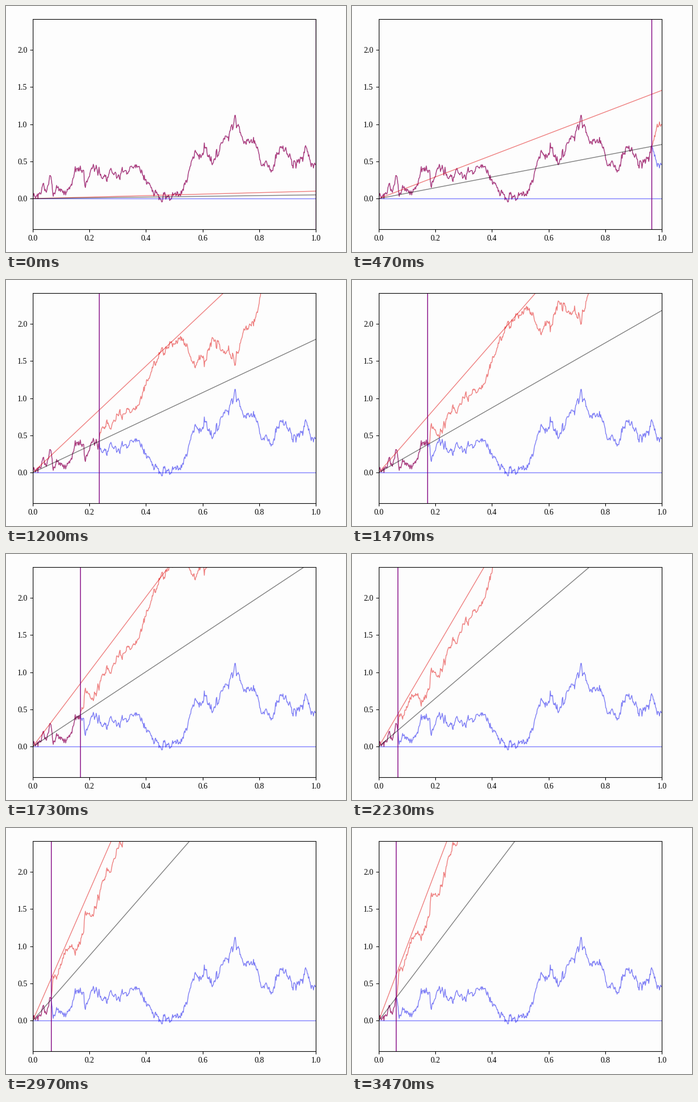
A matplotlib script for the animation above (3500 ms loop, 596 by 432 pixels).

```python
import numpy as np
import matplotlib.pyplot as plt
from matplotlib.animation import FuncAnimation
from matplotlib.lines import Line2D

W, H, DPI = 596, 432, 100
FRAMES, LOOP_MS = 105, 3500
LEFT, RIGHT, TOP, BOTTOM = 47, 543, 22.8, 392.4
UNIT, ZERO = 130.5, 338.2      # pixels per unit of y, pixel row of y = 0
STEPS = 500
PAPER, RED, BLUE = "#fdfdfd", "#e00000", "#0000ee"

# Main turning points of the walk: time, height
TURNS = np.array([
    (0, 0), (.03, .08), (.036, .2), (.046, .1), (.058, .26), (.064, .295),
    (.072, .03), (.09, .16), (.106, .08), (.138, .18), (.15, .43),
    (.158, .405), (.176, .38), (.186, .15), (.212, .43), (.22, .4), (.25, .3),
    (.29, .35), (.306, .27), (.344, .43), (.374, .43), (.404, .2), (.43, .05),
    (.52, .05), (.574, .65), (.588, .53), (.614, .69), (.632, .48),
    (.714, 1.12), (.73, .965), (.746, .74), (.784, .78), (.806, .47),
    (.844, .38), (.88, .68), (.92, .41), (.954, .5), (.966, .69), (.984, .43),
    (1, .46),
])


def make_walk():
    """Turning points joined by seeded, fading noise that is zero at each point."""
    rng = np.random.default_rng(11)
    t = np.linspace(0, 1, STEPS + 1)
    fade = 0.6 ** np.arange(8)
    noise = np.convolve(rng.normal(0, 0.03, t.size), fade)[:t.size]
    turn_t, turn_y = TURNS.T
    noise -= np.interp(t, turn_t, np.interp(turn_t, t, noise))
    return t, np.interp(t, turn_t, turn_y) + noise


def drift_at(frame):
    """Steady rise that slows slightly at the end."""
    return np.interp(frame, [0, 89, FRAMES - 1], [0.1, 8.72, 10.04])


plt.rcParams["font.family"] = "Liberation Serif"
plt.rcParams["font.size"] = 10

fig = plt.figure(figsize=(W / DPI, H / DPI), dpi=DPI, facecolor=PAPER)
ax = fig.add_axes([LEFT / W, 1 - BOTTOM / H, (RIGHT - LEFT) / W, (BOTTOM - TOP) / H],
                  facecolor=PAPER)
ax.set_xlim(0, 1)
ax.set_ylim((ZERO - BOTTOM) / UNIT, (ZERO - TOP) / UNIT)
ax.set_xticks(np.arange(0, 1.1, 0.2))
ax.set_yticks(np.arange(0, 2.1, 0.5))

# Thin rule along the lower edge of the stage
fig.add_artist(Line2D([0, 1], [0.5 / H] * 2, color="#b4b4b4", lw=0.72))

t, walk = make_walk()
thin = dict(lw=1, alpha=0.5)
ax.plot(t, walk, color=BLUE, **thin)
mirror, = ax.plot([], [], color=RED, **thin)
ax.plot([0, 1], [0, 0], color="blue", **thin)
drift_line, = ax.plot([], [], color=RED, **thin)
middle_line, = ax.plot([], [], color="black", **thin)
split = ax.axvline(1, color="purple", lw=1)


def update(frame):
    drift = drift_at(frame)
    # The walks part when the first one last leaves the middle line
    tau = t[walk >= drift * t / 2][-1]
    mirror.set_data(t, np.where(t > tau, drift * t - walk, walk))
    drift_line.set_data([0, 1], [0, drift])
    middle_line.set_data([0, 1], [0, drift / 2])
    split.set_xdata([tau, tau])
    return mirror, drift_line, middle_line, split


anim = FuncAnimation(fig, update, frames=FRAMES, interval=LOOP_MS / FRAMES,
                     repeat=True, repeat_delay=0, blit=False)
plt.show()
```
